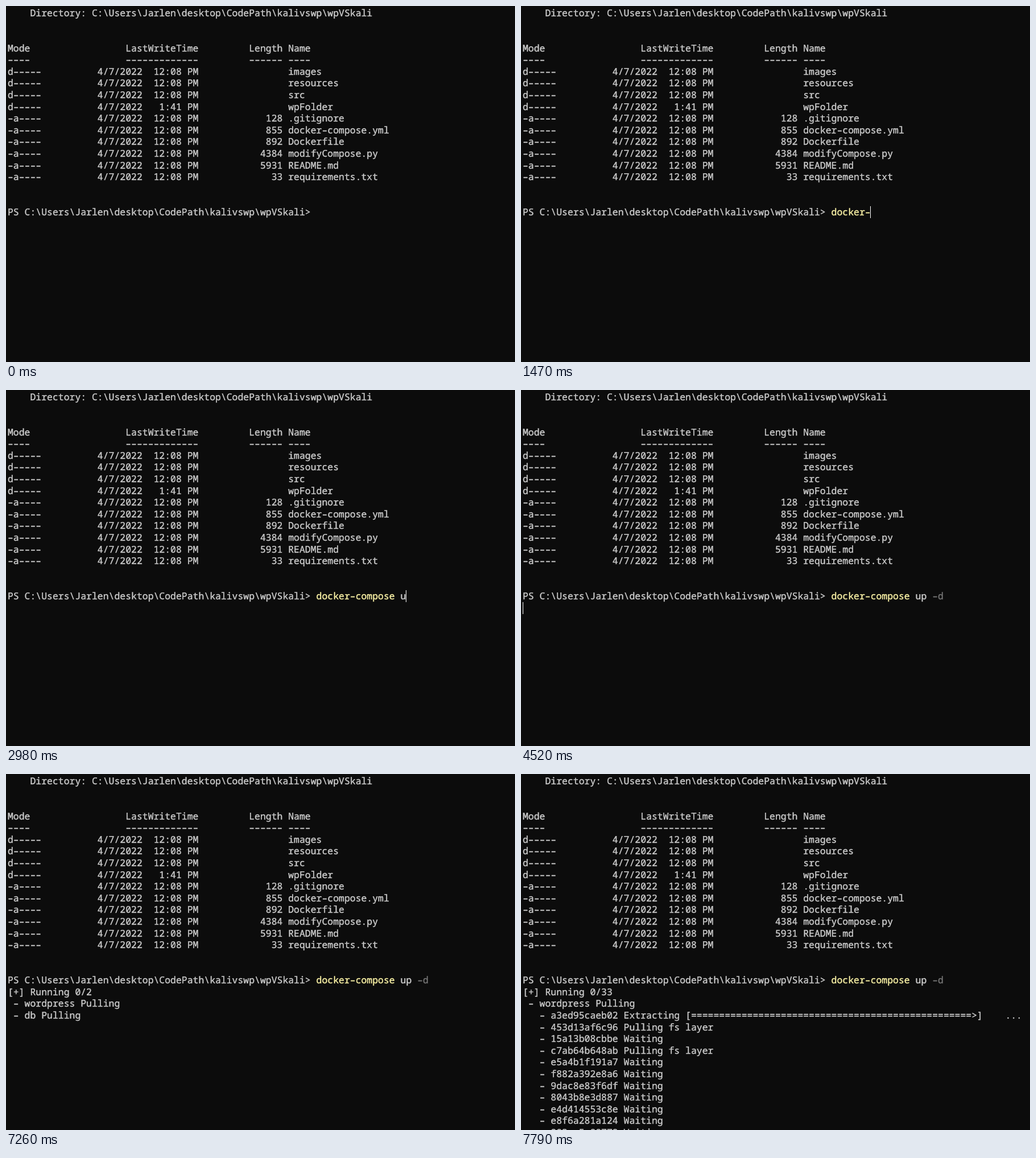
Recreate the animation shown at these times as an HTML page with a canvas. Size 895 px wide and 626 px high, loop 7990 ms.

```html
<!DOCTYPE html>
<html lang="en">
<head>
<meta charset="utf-8">
<title>Terminal</title>
<style>
html, body { margin: 0; width: 100%; height: 100%; overflow: hidden; background: #0c0c0c; }
canvas { display: block; }
</style>
</head>
<body>
<canvas id="screen" width="895" height="626"></canvas>
<script>
const ctx = document.getElementById('screen').getContext('2d');
const LOOP = 7990;
const CELL = 9.865, LINE = 20.61, LEFT = 3, TOP = 2;
const BASELINE = 15.7;
const GRAY = '#cccccc', DIM = '#767676', YELLOW = '#f9f1a5', GREEN = '#16c60c', RED = '#e74856';

const DIR = 'C:\\Users\\Jarlen\\desktop\\CodePath\\kalivswp\\wpVSkali';
const PROMPT = 'PS ' + DIR;
const COMMAND = 'docker-compose up -d';
const CMD_ROW = 17, CMD_COL = PROMPT.length + 2;

// Moment at which each character of the command is typed
const KEYS = [390, 590, 790, 860, 990, 1060, 1470, 1600, 1730, 1860, 1990,
  2190, 2320, 2580, 2780, 2980, 3180, 3440, 3840, 4120];
const CURSOR_ON = 130, ENTER = 4520, CURSOR_OFF = 5120, PULL = 5190;
const BLINKS = [5660, 6190, 6730, 7260];
const LAYERS_SHOWN = 7330, LAYERS_QUEUED = 7400, LAYERS_READY = 7530, EXTRACT = 7790;

const FILES = [
  ['images'], ['resources'], ['src'], ['wpFolder', '', '1:41'],
  ['.gitignore', '128'], ['docker-compose.yml', '855'], ['Dockerfile', '892'],
  ['modifyCompose.py', '4384'], ['README.md', '5931'], ['requirements.txt', '33']
];
const LAYERS = ['a3ed95caeb02', '453d13af6c96', '15a13b08cbbe', 'c7ab64b648ab',
  'e5a4b1f191a7', 'f882a392e8a6', '9dac8e83f6df', '8043b8e3d887',
  'e4d414553c8e', 'e8f6a281a124', '883ae5a88779'];

// Terminal text sits on a character grid; dashes are nearly a full cell wide.
// A hairline outline gives the slightly heavy stems of the console face.
function print(row, col, text, color = GRAY) {
  ctx.fillStyle = ctx.strokeStyle = color;
  const y = Math.round(TOP + row * LINE + BASELINE);
  [...text].forEach((ch, i) => {
    if (ch === ' ') return;
    const glyph = ch === '-' ? '\u2013' : ch;
    const x = LEFT + (col + i) * CELL;
    ctx.fillText(glyph, x, y);
    ctx.strokeText(glyph, x, y);
  });
}

function cursor(row, col) {
  ctx.fillStyle = '#ffffff';
  ctx.fillRect(Math.floor(LEFT + col * CELL), Math.round(TOP + row * LINE), 1, 21);
}

function listing() {
  print(0, 4, 'Directory: ' + DIR);
  [[0, 'Mode'], [21, 'LastWriteTime'], [43, 'Length'], [50, 'Name']].forEach(([col, head]) => {
    print(3, col, head);
    print(4, col, '-'.repeat(head.length));
  });
  FILES.forEach(([name, size = '', time = '12:08'], i) => {
    const row = 5 + i;
    print(row, 0, size ? '-a----' : 'd-----');
    print(row, 16, '4/7/2022  ' + time.padStart(5) + ' PM');
    print(row, 43, size.padStart(6));
    print(row, 50, name);
  });
}

function commandLine(t) {
  const typed = KEYS.filter(k => t >= k).length;
  const keyword = typed === 2; // "do" alone is an unfinished statement
  print(CMD_ROW, 0, PROMPT);
  print(CMD_ROW, PROMPT.length, '>', keyword ? RED : GRAY);
  const part = (from, to, color) =>
    print(CMD_ROW, CMD_COL + from, COMMAND.slice(from, Math.min(to, typed)), color);
  part(0, 14, keyword ? GREEN : YELLOW);
  part(15, 17, GRAY);
  part(18, 20, DIM);
  if (t >= CURSOR_ON && t < ENTER) cursor(CMD_ROW, CMD_COL + typed);
  if (t >= ENTER && t < CURSOR_OFF) cursor(CMD_ROW + 1, 0);
}

function layerStatus(i, t) {
  if (i === 0 && t >= EXTRACT) return 'Extracting [' + '='.repeat(50) + '>]    ...';
  const queued = t >= LAYERS_READY ? i === 2 || i > 3 : t >= LAYERS_QUEUED && i > 5;
  return queued ? 'Waiting' : 'Pulling fs layer';
}

function output(t) {
  if (t < PULL) return;
  const layers = t >= LAYERS_SHOWN;
  print(18, 0, '[+] Running 0/' + (layers ? 33 : 2));
  print(19, 1, '- wordpress Pulling');
  if (layers) {
    LAYERS.forEach((id, i) => print(20 + i, 3, '- ' + id + ' ' + layerStatus(i, t)));
  } else {
    print(20, 1, '- db Pulling');
    if (BLINKS.filter(b => t >= b).length % 2) cursor(21, 0);
  }
}

function draw(t) {
  ctx.fillStyle = '#0c0c0c';
  ctx.fillRect(0, 0, 895, 626);
  ctx.font = '16.45px "Noto Sans Mono", "DejaVu Sans Mono", monospace';
  ctx.textRendering = 'geometricPrecision';
  ctx.lineWidth = 0.4;
  ctx.lineJoin = 'round';
  listing();
  commandLine(t);
  output(t);
}

const start = performance.now();
function tick() {
  draw((performance.now() - start) % LOOP);
  requestAnimationFrame(tick);
}
tick();
</script>
</body>
</html>
```
